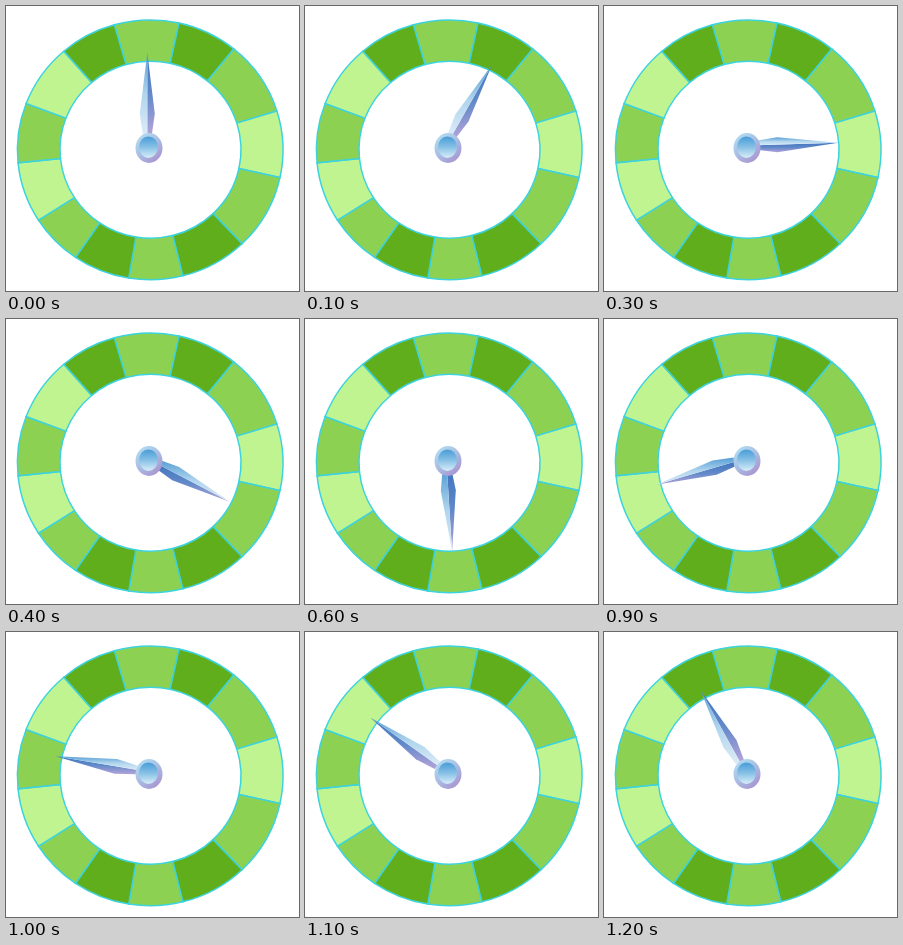
An HTML page with a canvas that plays this animation: 293 by 285 pixels, repeating every 1.3 s.

```html
<!DOCTYPE html>
<html lang="en">
<head>
<meta charset="utf-8">
<title>Dial</title>
<style>
html, body { margin: 0; width: 100%; height: 100%; overflow: hidden; background: #fff; }
canvas { display: block; }
</style>
</head>
<body>
<canvas id="stage" width="293" height="285"></canvas>
<script>
const ctx = document.getElementById('stage').getContext('2d');
const STEP = 100, COUNT = 13;
const OUTER = { x: 144.2, y: 143.9, rx: 132.8, ry: 129.9 };
const INNER = { x: 144.5, y: 143.7, rx: 90.5, ry: 88.5 };
const HUB = { x: 143, y: 142 };
const PIVOT = { x: 141.3, y: 139.7 };
const NEEDLE = 93;

// Sector start angles in degrees, clockwise from the top
const BORDERS = [-16, 12.8, 39.6, 72.9, 102, 135.6, 165.5, 189.5, 214.8, 237.8, 264.4, 290.5, 318.8];
const SECTORS = 'mdmlmdmdmlmld';
const COLORS = { m: '#8dd152', d: '#61ae1d', l: '#c0f490' };

// Direction of a clock angle, and the matching parameter on an ellipse
const heading = deg => {
  const a = deg * Math.PI / 180;
  return [Math.sin(a), -Math.cos(a)];
};
const param = (e, deg) => {
  const [x, y] = heading(deg);
  return Math.atan2(y / e.ry, x / e.rx);
};

const arc = (e, from, to, back) =>
  ctx.ellipse(e.x, e.y, e.rx, e.ry, 0, param(e, from), param(e, to), back);

function gradient(x0, y0, x1, y1, colors) {
  const g = ctx.createLinearGradient(x0, y0, x1, y1);
  colors.forEach((c, i) => g.addColorStop(i / (colors.length - 1), c));
  return g;
}

function drawRing() {
  ctx.strokeStyle = '#3dd3dd';
  ctx.lineWidth = 1.5;
  BORDERS.forEach((from, i) => {
    const to = BORDERS[(i + 1) % COUNT];
    ctx.beginPath();
    arc(OUTER, from, to, false);
    arc(INNER, to, from, true);
    ctx.closePath();
    ctx.fillStyle = COLORS[SECTORS[i]];
    ctx.fill();
    ctx.stroke();
  });
}

// Wider steps down the right half than up the left
const needleAngle = step => step < 6 ? 29.4 * step : 176.4 + 25.8 * (step - 6);

function drawNeedle(deg) {
  const [ux, uy] = heading(deg);
  const at = (along, side) => [PIVOT.x + ux * along - uy * side, PIVOT.y + uy * along + ux * side];
  const lit = ux > uy ? -1 : 1; // the side facing the upper left

  const facet = (side, colors) => {
    const points = [at(NEEDLE, 0), at(32, 7.5 * side), at(11, 4.5 * side), at(11, 0)];
    const ys = points.map(p => p[1]);
    ctx.fillStyle = gradient(0, Math.min(...ys), 0, Math.max(...ys), colors);
    ctx.beginPath();
    points.forEach(p => ctx.lineTo(...p));
    ctx.fill();
  };
  facet(-lit, ['#3f74bd', '#6289c9', '#b3a3d9']);
  facet(lit, ['#559dd5', '#b0d5ed', '#dcecf8']);
}

function drawHub() {
  const disc = (x, y, rx, ry, fill) => {
    ctx.beginPath();
    ctx.ellipse(x, y, rx, ry, 0, 0, 2 * Math.PI);
    ctx.fillStyle = fill;
    ctx.fill();
  };
  disc(HUB.x, HUB.y, 13.5, 15, gradient(134, 131, 152, 153, ['#b0d8ef', '#a9bce2', '#a998d2']));
  disc(HUB.x - 0.5, HUB.y - 0.8, 9.5, 10.8, gradient(0, 130, 0, 152, ['#459bd7', '#86c0e6', '#d8edf8']));
}

const start = performance.now();

function frame() {
  const step = Math.floor((performance.now() - start) / STEP) % COUNT;
  ctx.clearRect(0, 0, 293, 285);
  drawRing();
  drawNeedle(needleAngle(step));
  drawHub();
  requestAnimationFrame(frame);
}

frame();
</script>
</body>
</html>
```
